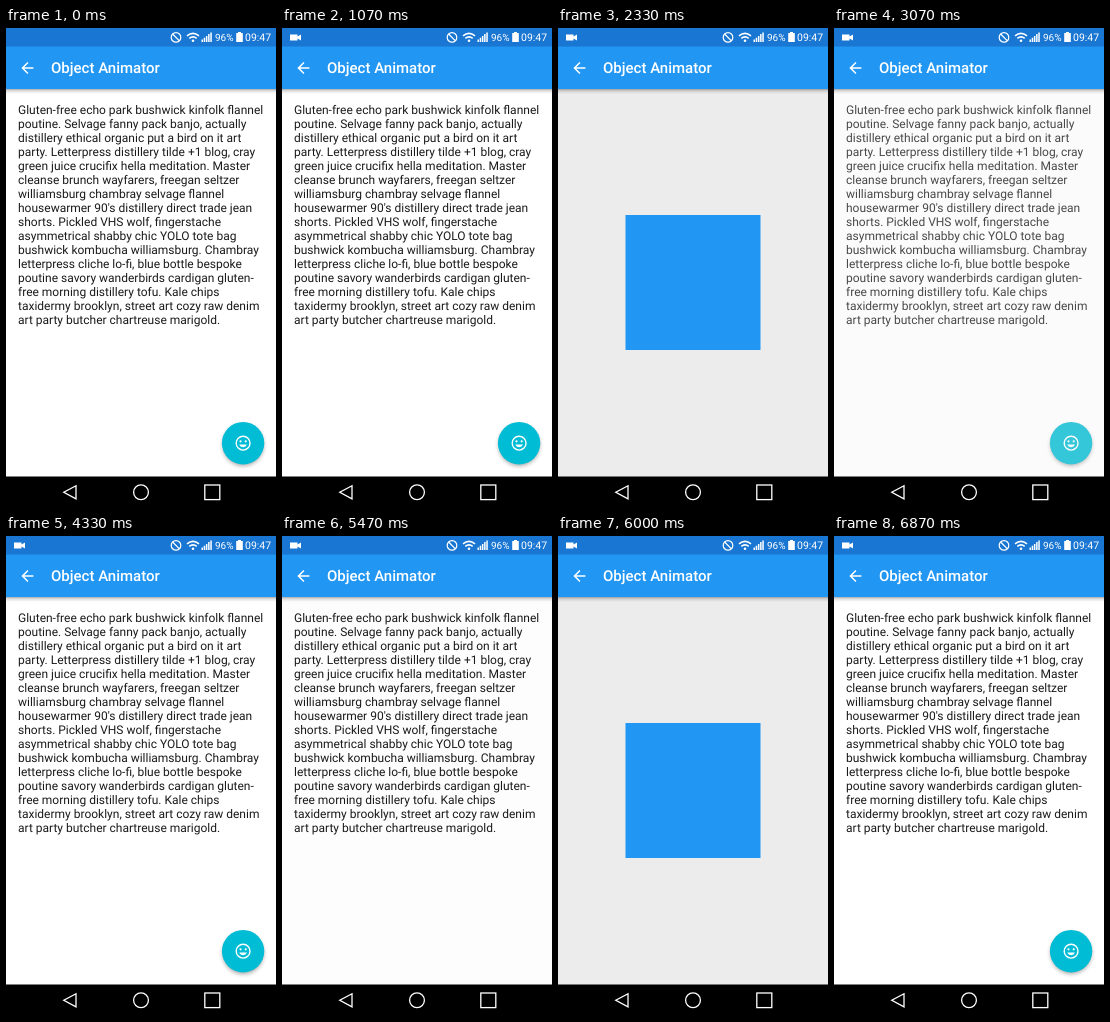
Write an HTML page that moves like this. It is 270 by 480 pixels and loops after 6.94 s.

```html
<!DOCTYPE html>
<html lang="en">
<head>
<meta charset="utf-8">
<title>Object Animator</title>
<style>
  html, body { margin: 0; width: 100%; height: 100%; overflow: hidden; background: #000; }
  svg { display: block; width: 100vw; height: 100vh; font-family: Roboto, sans-serif; text-rendering: geometricPrecision; }
  .line { fill: none; stroke: #fff; }
</style>
</head>
<body>
<svg viewBox="0 0 270 480">
  <defs>
    <linearGradient id="shade" x2="0" y2="1">
      <stop stop-opacity=".32"/>
      <stop offset=".4" stop-opacity=".12"/>
      <stop offset="1" stop-opacity="0"/>
    </linearGradient>
    <filter id="soft" x="-50%" y="-50%" width="200%" height="200%">
      <feGaussianBlur stdDeviation="2"/>
    </filter>
  </defs>

  <rect width="270" height="480" fill="#fff"/>
  <text id="copy" font-size="12" fill="#1a1a1a"></text>

  <g id="fab" transform="translate(237.1 415.2)">
    <circle id="shadow" cy="2" r="20.5" opacity=".35" filter="url(#soft)"/>
    <circle r="21.2" fill="#00bcd4"/>
    <circle id="ripple" fill="#fff"/>
    <circle r="6.9" class="line" stroke-width="1.4"/>
    <g fill="#fff">
      <circle cx="-2.6" cy="-1.9" r="1.1"/>
      <circle cx="2.6" cy="-1.9" r="1.1"/>
      <path d="M-3.9 1.4H3.9A4.2 4.2 0 0 1-3.9 1.4Z"/>
    </g>
  </g>

  <rect id="cover" y="61" width="270" height="388"/>
  <rect id="square" x="67.5" y="187" width="135" height="135" fill="#2196f3"/>

  <rect y="61" width="270" height="5" fill="url(#shade)"/>
  <rect y="18" width="270" height="43" fill="#2196f3"/>
  <rect width="270" height="18.5" fill="#1976d2"/>
  <path transform="translate(12.4 31) scale(.75)" fill="#fff"
    d="M20 11H7.8l5.6-5.6L12 4l-8 8 8 8 1.4-1.4L7.8 13H20z"/>
  <text x="45" y="45" font-size="15" font-weight="500" fill="#fff">Object Animator</text>

  <g fill="#fff">
    <path id="camera" d="M8 6.5h7.5v2l3.5-2v6l-3.5-2v2H8z"/>
    <path d="M195.5 11.5h1.5V14h-1.5zm2.2-1.8h1.5V14h-1.5zm2.2-1.8h1.5V14h-1.5zm2.2-1.8h1.5V14h-1.5zm2.2-1.6h1.5V14h-1.5z"/>
    <path d="M232 5v-1h3v1h1.8v9h-6.6V5z"/>
    <circle cx="187" cy="12.8" r="1.3"/>
    <text x="209" y="13.2" font-size="10">96%</text>
    <text x="239" y="13.2" font-size="10.5">09:47</text>
  </g>
  <g class="line" stroke-width="1.2">
    <circle cx="170" cy="9.4" r="4.8"/>
    <path d="M166.6 6l6.8 6.8"/>
    <path d="M181 7.8Q187 3 193 7.8M183.3 10.4Q187 7.4 190.7 10.4" stroke-width="1.6"/>
  </g>

  <rect y="448.5" width="270" height="31.5"/>
  <g class="line" stroke-width="1.3">
    <path d="M70 457.8v13L57.8 464.3z"/>
    <circle cx="135" cy="464.3" r="7.4"/>
    <rect x="198.8" y="457" width="15" height="14.6"/>
  </g>
</svg>
<script>
const LOOP = 6940;
const BLUE = [33, 150, 243], GRAY = [236, 236, 236];
const ENTER = 530, FADE = 267, PRESS = 430;
const visits = [
  { press: 640, enter: 1771, leave: 2463, close: 2863 },
  { press: 4310, enter: 5457, leave: 6203, close: 6590 },
];
const lines = `Gluten-free echo park bushwick kinfolk flannel
poutine. Selvage fanny pack banjo, actually
distillery ethical organic put a bird on it art
party. Letterpress distillery tilde +1 blog, cray
green juice crucifix hella meditation. Master
cleanse brunch wayfarers, freegan seltzer
williamsburg chambray selvage flannel
housewarmer 90's distillery direct trade jean
shorts. Pickled VHS wolf, fingerstache
asymmetrical shabby chic YOLO tote bag
bushwick kombucha williamsburg. Chambray
letterpress cliche lo-fi, blue bottle bespoke
poutine savory wanderbirds cardigan gluten-
free morning distillery tofu. Kale chips
taxidermy brooklyn, street art cozy raw denim
art party butcher chartreuse marigold.`.split("\n");

const el = id => document.getElementById(id);
const set = (id, attrs) => {
  for (const key in attrs) el(id).setAttribute(key, attrs[key]);
};
const progress = (t, start, length) => Math.min(1, Math.max(0, (t - start) / length));
const ease = p => (1 - Math.cos(Math.PI * p)) / 2;
const mix = (a, b, p) => a.map((v, i) => v + (b[i] - v) * p);

el("copy").innerHTML = lines
  .map((line, i) => `<tspan x="12" y="${85.7 + i * 14.04}">${line}</tspan>`).join("");

// The cover blends from transparent black to blue, then to gray.
function coverColor(p) {
  if (p >= .5) return [...mix(BLUE, GRAY, ease(2 * p - 1)), 1];
  return mix([0, 0, 0, 0], [...BLUE, 1], ease(2 * p));
}

function draw(t) {
  const visit = visits[t < 3700 ? 0 : 1];
  const press = progress(t, visit.press, PRESS);
  const enter = progress(t, visit.enter, ENTER);
  const leave = progress(t, visit.leave, FADE);
  const close = progress(t, visit.close, FADE);
  const lift = Math.sin(Math.PI * press);

  set("camera", { opacity: t < 70 ? 0 : 1 });
  set("fab", { opacity: enter > 0 && close === 0 ? 0 : 1 });
  set("ripple", { r: 21.2 * Math.min(1, press * 2), opacity: .25 * lift });
  set("shadow", { cy: 2 + 2 * lift });
  set("cover", { fill: `rgba(${coverColor(enter)})`, opacity: 1 - close });
  set("square", { opacity: enter < .5 ? 0 : 1 - leave });
}

const start = performance.now();
function tick() {
  draw((performance.now() - start) % LOOP);
  requestAnimationFrame(tick);
}
tick();
</script>
</body>
</html>
```
